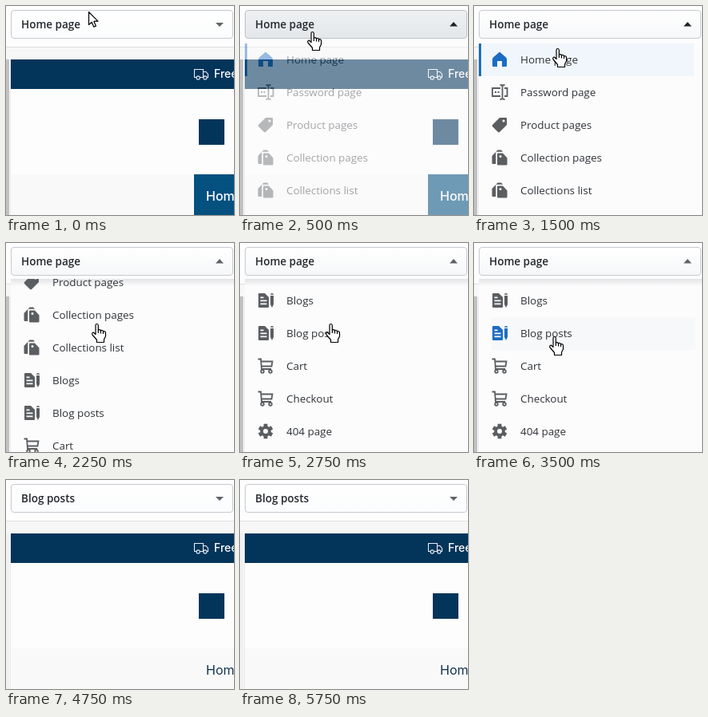
These frames come from a looping animation (285x262 px, 6.5 s). An HTML page with a canvas:

```html
<!DOCTYPE html>
<html lang="en">
<head>
<meta charset="utf-8">
<title>Page picker</title>
<style>
html, body { margin: 0; width: 285px; height: 262px; overflow: hidden; background: #fff; }
canvas { display: block; }
</style>
</head>
<body>
<canvas id="stage" width="285" height="262"></canvas>
<script>
const W = 285, H = 262, LOOP = 6500, STEP = 250;
const stage = document.getElementById('stage').getContext('2d');
const sheet = document.createElement('canvas');
sheet.width = W;
sheet.height = H;
const menu = sheet.getContext('2d');

const UI = '"Open Sans", "Noto Sans", sans-serif';
const SHOP = 'Inter, "Open Sans", sans-serif';
const NAVY = '#03345a', BLUE = '#1c6cc1', GREY = '#5b5e61';

const ITEMS = [
  ['Home page', 'home'], ['Password page', 'field'], ['Product pages', 'tag'],
  ['Collection pages', 'tags'], ['Collections list', 'tags'], ['Blogs', 'blog'],
  ['Blog posts', 'blog'], ['Cart', 'cart'], ['Checkout', 'cart'], ['404 page', 'gear']
];
const ROW = 41, FIRST = 67;

const HAND = new Path2D('M5 2Q5 .5 6.5 .5T8.3 2V8Q10.5 7 11.5 8.8Q13.7 7.8 14.5 9.8Q17.5 9.3 17.5 12V16L15.5 20V23.5H6.5V20.5L1 14Q0 11.3 2.3 11L5 13.5Z');
const KNUCKLES = new Path2D('M8.3 8V12M11.5 9V12.5M14.5 10V13');
const ARROW = new Path2D('M.5 .5V16.5L4.2 13.2L6.8 19.2L9.4 18.1L6.9 12.2H12Z');
const TAG = new Path2D('M0 -9H8Q9 -9 9 -8V0L0 9Q-1 9.5 -2 9L-9 2Q-9.5 1 -9 0ZM5 -6.6A1.6 1.6 0 1 0 5 -3.4A1.6 1.6 0 1 0 5 -6.6Z');
const TRUCK = new Path2D('M3 11.5H.5V1.5H11.5V11.5H7.5M11.5 4.5H15L17.5 7.5V11.5H16M12 11.5H7.5M7.3 12A2.1 2.1 0 1 1 3.1 12A2.1 2.1 0 1 1 7.3 12M16 12A2.1 2.1 0 1 1 11.8 12A2.1 2.1 0 1 1 16 12');

function rect(c, color, x, y, w, h) {
  c.fillStyle = color;
  c.fillRect(x, y, w, h);
}

function text(c, str, x, y, font, color) {
  c.font = font;
  c.fillStyle = color;
  c.fillText(str, x, y);
}

function at(c, x, y, draw) {
  c.save();
  c.translate(x, y);
  draw();
  c.restore();
}

function fade(c, y0, y1, from, to) {
  const g = c.createLinearGradient(0, y0, 0, y1);
  g.addColorStop(0, from);
  g.addColorStop(1, to);
  return g;
}

// Each icon is drawn around its own centre.
const icons = {
  home(c) {
    c.fill(new Path2D('M0 -9.5L8 -2.5Q9 -1.5 9 0V8Q9 9 8 9H3V2H-3V9H-8Q-9 9 -9 8V0Q-9 -1.5 -8 -2.5Z'));
  },
  field(c) {
    c.lineWidth = 1.8;
    c.stroke(new Path2D('M1 -5H-9V5H1M6 -5H9.5V5H6M3.5 -8V8M.5 -9Q3.5 -9 3.5 -7.5Q3.5 -9 6.5 -9M.5 9Q3.5 9 3.5 7.5Q3.5 9 6.5 9'));
    rect(c, GREY, -6, -1, 2, 2);
    rect(c, GREY, -2.5, -1, 2, 2);
  },
  tag(c) {
    c.fill(TAG, 'evenodd');
  },
  tags(c) {
    c.fill(new Path2D('M-2 -5.5H4L9.5 .5V8.5Q9.5 9.5 8.5 9.5H-2Q-3 9.5 -3 8.5V-4.5Q-3 -5.5 -2 -5.5ZM1 -3A1.5 1.5 0 1 0 1 0A1.5 1.5 0 1 0 1 -3Z'), 'evenodd');
    c.fill(new Path2D('M-2.5 -9.5H2L4 -7.2H-4.7V8H-8.5Q-9.5 8 -9.5 7V-2Z'));
  },
  blog(c) {
    c.fill(new Path2D('M-8 -9H-1L4 -4V8Q4 9 3 9H-8Q-9 9 -9 8V-8Q-9 -9 -8 -9Z'));
    c.fill(new Path2D('M6 -6H10V5L8 9L6 5ZM6 -7.2V-8Q8 -10 10 -8V-7.2Z'));
    for (const [y, w] of [[-4.5, 4], [-.5, 8], [3.5, 8]]) rect(c, '#fcfcfd', -6.5, y, w, 1.7);
  },
  cart(c) {
    c.lineWidth = 1.8;
    c.stroke(new Path2D('M-9.5 -8.5H-6L-5 4H7M-5.7 -5.5H8.5L7.5 .5H-5.3'));
    for (const x of [-4, 6]) {
      c.beginPath();
      c.arc(x, 7, 1.8, 0, 7);
      c.stroke();
    }
  },
  gear(c) {
    c.beginPath();
    c.arc(0, 0, 6.8, 0, 2 * Math.PI);
    c.moveTo(3, 0);
    c.arc(0, 0, 3, 0, 2 * Math.PI, true);
    c.fill('evenodd');
    for (let i = 0; i < 6; i++) {
      c.fillRect(-2.4, -9.3, 4.8, 4);
      c.rotate(Math.PI / 3);
    }
  }
};

function drawPage(k) {
  rect(stage, '#fdfdfe', 0, 0, W, H);
  rect(stage, '#dddfe1', 0, 51, W, 1);
  rect(stage, '#f7f7f8', 0, 52, W, H - 52);
  rect(stage, k < 15 ? '#c1c1c1' : '#f1f1f1', 0, 67, 4, H);
  rect(stage, '#e9eaeb', 5, 67, 1, H);
  rect(stage, NAVY, 6, 67, W, 37);
  rect(stage, '#fdfdfe', 6, 104, W, 107);
  rect(stage, '#f9f9f9', 6, 211, W, H);

  stage.strokeStyle = '#e6ecf1';
  stage.lineWidth = 1.1;
  at(stage, 235, 78, () => stage.stroke(TRUCK));
  text(stage, 'Free', 260, 90, '500 14px ' + SHOP, '#fff');

  rect(stage, NAVY, 241, 142, 32, 32);

  const lit = k < 19;
  if (lit) rect(stage, '#04507f', 235, 211, 50, 51);
  text(stage, 'Home', 250, 244, (lit ? '500' : '400') + ' 16px ' + SHOP, lit ? '#fff' : '#12344f');
}

function drawButton(k) {
  const pressed = k >= 1 && k < 6, open = k >= 2 && k < 15;
  stage.beginPath();
  stage.roundRect(6.5, 5.5, 277, 35, 3.5);
  stage.fillStyle = pressed ? fade(stage, 5, 41, '#eef0f2', '#e4e7ea')
    : fade(stage, 5, 41, '#ffffff', open ? '#f6f7f9' : '#fbfcfd');
  stage.fill();
  stage.strokeStyle = pressed ? '#bcc1c6' : '#c6cacf';
  stage.lineWidth = 1;
  stage.stroke();
  text(stage, k < 15 ? 'Home page' : 'Blog posts', 19, 28, '600 13.5px ' + UI, '#24292e');

  const [base, tip] = open ? [25.5, 20] : [21, 26];
  stage.beginPath();
  stage.moveTo(262, base);
  stage.lineTo(272, base);
  stage.lineTo(267, tip);
  stage.fillStyle = open && k < 8 ? '#1f2326' : '#5f6468';
  stage.fill();
}

function scrollAt(k) {
  if (k < 8) return 0;
  return [1, 100, 165][k - 8] ?? 200;
}

function hoverAt(k) {
  if (k === 6) return 0;
  if (k === 7 || k === 8) return 1;
  return k >= 12 ? 6 : -1;
}

function drawMenu(k) {
  const off = scrollAt(k), hover = hoverAt(k);
  menu.clearRect(0, 0, W, H);
  menu.save();
  menu.beginPath();
  menu.rect(6, 45, W, H);
  menu.clip();
  rect(menu, '#fcfcfd', 0, 0, W, H);

  ITEMS.forEach(([label, icon], i) => {
    const y = FIRST + i * ROW - off;
    const picked = i === 0 || (i === 6 && k >= 14);
    if (hover === i) rect(menu, i ? '#f6f8fa' : '#f0f6fb', i ? 22 : 9, y - 20, i ? 255 : 266, 41);
    if (i === 0) rect(menu, BLUE, 6, y - 20, 3, 41);
    menu.fillStyle = menu.strokeStyle = picked ? BLUE : GREY;
    at(menu, 32, y, () => icons[icon](menu));
    text(menu, label, 58, y + 5, '400 13.4px ' + UI, '#2f3337');
  });

  if (off > 1) rect(menu, fade(menu, 45, 54, 'rgba(90,95,100,.16)', 'rgba(90,95,100,0)'), 6, 45, W, 9);
  menu.restore();
}

function drawCursor(k) {
  if (k >= 19) return;
  const hand = k >= 1 && k < 16;
  let x, y;
  if (k === 0) [x, y] = [103, 7];
  else if (k < 6) [x, y] = [84, 32];
  else if (k === 6) [x, y] = [98, 53];
  else if (k < 12) [x, y] = [107, 101];
  else if (k === 12) [x, y] = [99, 123];
  else if (k < 17) [x, y] = [94, 117];
  else if (k === 17) [x, y] = [94, 123];
  else [x, y] = [140, 198];

  at(stage, x, y, () => {
    const shape = hand ? HAND : ARROW;
    stage.lineJoin = 'round';
    stage.lineWidth = 1.2;
    stage.fillStyle = '#fff';
    stage.strokeStyle = '#000';
    stage.fill(shape);
    stage.stroke(shape);
    if (hand) stage.stroke(KNUCKLES);
  });
}

function draw(ms) {
  const k = Math.floor((ms % LOOP) / STEP);
  drawPage(k);
  if (k >= 2 && k <= 15) {
    drawMenu(k);
    stage.globalAlpha = k === 2 || k === 15 ? 0.43 : 1;
    stage.drawImage(sheet, 0, 0);
    stage.globalAlpha = 1;
  }
  drawButton(k);
  drawCursor(k);
}

const start = performance.now();
function tick() {
  draw(performance.now() - start);
  requestAnimationFrame(tick);
}
tick();
</script>
</body>
</html>
```
